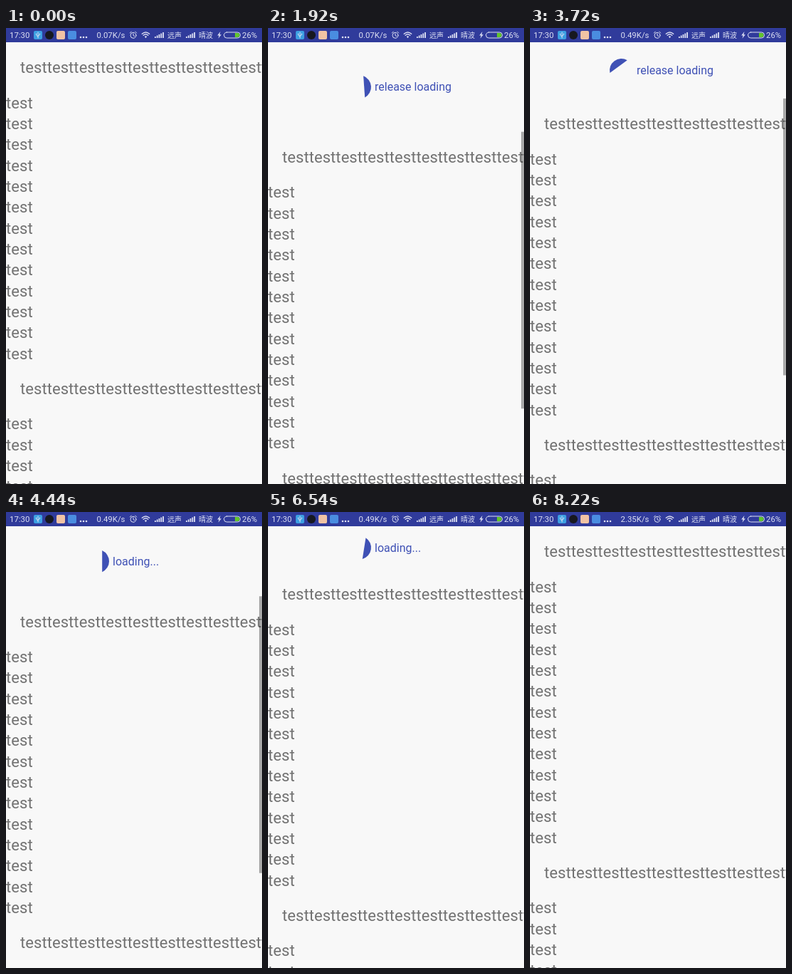
Animation, 360 px wide and 640 px high, one loop 8400 ms. Source, as an HTML page:

```html
<!DOCTYPE html>
<html lang="en">
<head>
<meta charset="utf-8">
<title>Pull to refresh</title>
<style>
  html, body { margin: 0; width: 100%; height: 100%; overflow: hidden; background: #f8f8f8; }
  svg { display: block; width: 360px; height: 640px; font-family: Roboto, sans-serif; }
  #list { font-size: 22px; fill: #727272; font-kerning: none; letter-spacing: .067px; }
  #header { font-size: 16px; fill: #3f51b5; }
  #status { font-size: 11.4px; fill: #dde0f3; }
  #status .cjk { font: 10px "Noto Sans CJK SC", "Noto Sans CJK", sans-serif; }
  .line { fill: none; stroke: #dde0f3; stroke-linecap: round; }
</style>
</head>
<body>
<svg viewBox="0 0 360 640">
  <defs>
    <g id="signal">
      <path d="M0 14v-2h1.8v2zM2.8 14v-3.5h1.8v3.5zM5.6 14v-5h1.8v5zM8.4 14V7.4h1.8V14zM11.2 14V6H13v8z"/>
    </g>
  </defs>

  <rect width="360" height="640" fill="#f8f8f8"/>

  <g id="header">
    <path id="segment" transform="translate(128.5 0)"/>
    <text id="label" x="150" y="5.5"></text>
  </g>

  <g id="list"></g>
  <rect id="bar" x="356" y="20" width="4" height="388.5" fill="#000" fill-opacity=".32"/>

  <g id="status">
    <rect width="360" height="20" fill="#303b9b"/>
    <text x="5" y="14">17:30</text>
    <rect x="39" y="4" width="12" height="12" rx="2" fill="#3c9fe2"/>
    <path class="line" stroke="#fff" d="M45 6v8M42.5 8v2l2.5 2M47.5 8v1.5L45 11"/>
    <circle cx="61" cy="10" r="6" fill="#17181f"/>
    <rect x="71" y="4" width="12" height="12" rx="2" fill="#f1c3a4"/>
    <rect x="87" y="4" width="12" height="12" rx="2" fill="#4a8de0"/>
    <circle cx="105" cy="13" r="1.3"/>
    <circle cx="109" cy="13" r="1.3"/>
    <circle cx="113" cy="13" r="1.3"/>
    <text id="speed" x="167.5" y="14" text-anchor="end"></text>
    <g class="line">
      <circle cx="179" cy="10.3" r="4"/>
      <path d="M179 8v2.6l1.8.8M174.3 7l2-2M183.7 7l-2-2"/>
      <path stroke-width="1.4" d="M191.3 8.2q5.2-4.6 10.4 0M193.2 10.3q3.3-2.9 6.6 0"/>
    </g>
    <path d="M194.8 12q1.7-1.4 3.4 0l-1.7 2.2z"/>
    <use href="#signal" x="209"/>
    <text class="cjk" x="227" y="13.8">远声</text>
    <use href="#signal" x="253"/>
    <text class="cjk" x="271" y="13.8">晴波</text>
    <path d="M301.5 5l-4.3 5.6h2.5l-1.2 4.2 4.3-5.6h-2.4z"/>
    <rect class="line" x="306.5" y="6" width="23" height="8" rx="4"/>
    <path d="M322 7h3.5a3 3 0 0 1 0 6H322z" fill="#62c52b"/>
    <text x="332" y="14">26%</text>
  </g>
</svg>

<script>
const LOOP = 8400, STEP = 60, LAST = 8220;
const TOP = 20, REST = 60, PEAK = 128;
const RADIUS = 16.5, HALF_SWEEP = 66;
const MARGIN = 20, ROW = 88 / 3, ROWS = 13, BASELINE = 70 / 3;
const RELEASE = 4320, SETTLED = 4800, CLOSE = 7800;

const $ = id => document.getElementById(id);

// Finger travel until release, as [time, pixels]
const drag = [[300, 0], [600, 18], [1140, 62], [1920, 125.67], [2150, 129],
              [2850, 26], [3000, 22.33], [3200, 29], [4200, 125], [RELEASE, PEAK]];
const spin = [[300, -160], [1140, 45], [1920, 356], [2150, 362], [3000, 135],
              [3200, 160], [RELEASE, 319], [4440, 360], [6540, 1089], [LAST, 1672]];
const tint = [[900, 1], [1140, .5], [1400, 1]];
const barFade = [[300, 0], [420, 1], [5000, 1], [5300, 0]];

function track(keys, t) {
  if (t <= keys[0][0]) return keys[0][1];
  for (let i = 1; i < keys.length; i++) {
    const [t0, a] = keys[i - 1], [t1, b] = keys[i];
    if (t <= t1) return a + (b - a) * (t - t0) / (t1 - t0);
  }
  return keys[keys.length - 1][1];
}

function ease(from, to, t0, t1, t) {
  const p = Math.min(1, (t - t0) / (t1 - t0));
  return to + (from - to) * (1 - p) ** 2;
}

function offsetAt(t) {
  if (t < RELEASE) return track(drag, t);
  if (t < CLOSE) return ease(PEAK, REST, RELEASE, SETTLED, t);
  return ease(REST, 0, CLOSE, LAST, t);
}

function segmentPath(angle, r) {
  const point = deg => {
    const a = deg * Math.PI / 180;
    return `${r * Math.cos(a)} ${r * Math.sin(a)}`;
  };
  return `M${point(angle - HALF_SWEEP)}A${r} ${r} 0 0 1 ${point(angle + HALF_SWEEP)}Z`;
}

// The invisible tilt keeps text baselines from snapping to whole pixels
const moveDown = y => `translate(0 ${y}) rotate(.002)`;

function addText(x, y, str) {
  const el = document.createElementNS("http://www.w3.org/2000/svg", "text");
  el.setAttribute("x", x);
  el.setAttribute("y", y);
  el.textContent = str;
  $("list").append(el);
}

function addBlock(top) {
  addText(MARGIN, top + MARGIN + BASELINE, "test".repeat(12));
  const first = top + 2 * MARGIN + ROW;
  for (let i = 0; i < ROWS; i++) addText(0, first + i * ROW + BASELINE, "test");
  return first + ROWS * ROW;
}

addBlock(addBlock(TOP));

function draw(t) {
  const y = offsetAt(t);
  $("list").setAttribute("transform", moveDown(y));
  $("bar").setAttribute("transform", `translate(0 ${y})`);
  $("bar").setAttribute("opacity", track(barFade, t));

  $("header").setAttribute("transform", moveDown(TOP + y / 2));
  $("header").setAttribute("visibility", y > 0 ? "visible" : "hidden");
  $("label").textContent = t >= RELEASE ? "loading..." : y >= REST ? "release loading" : "drag";

  $("segment").setAttribute("d", segmentPath(track(spin, t), RADIUS * Math.min(1, y / REST)));
  $("segment").setAttribute("opacity", track(tint, t));

  $("speed").textContent = (t < 2700 ? "0.07" : t < 6700 ? "0.49" : "2.35") + "K/s";
}

const start = performance.now();
function tick() {
  const t = (performance.now() - start) % LOOP;
  draw(Math.min(LAST, Math.floor(t / STEP) * STEP));
  requestAnimationFrame(tick);
}
tick();
</script>
</body>
</html>
```
